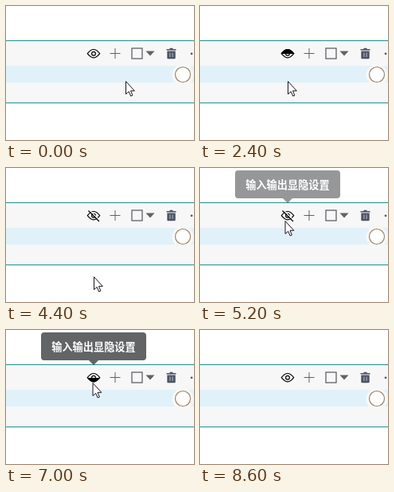
An HTML page that plays this animation: 236 px wide and 168 px high, repeating every 9.4 s.

```html
<!DOCTYPE html>
<html lang="zh-CN">
<head>
<meta charset="utf-8">
<style>
html, body { margin: 0; width: 100%; height: 100%; overflow: hidden; background: #fff; }
svg { display: block; width: 236px; height: 168px; }
text { font-family: "Noto Sans CJK SC", "Noto Sans CJK", "Noto Sans", sans-serif; }
#menu { transform-origin: 0 81px; }
#box { fill: #fff; stroke: #e4e7ed; filter: drop-shadow(0 2px 5px rgba(0,0,0,.14)); }
.item text { font-size: 15.3px; fill: #606266; }
.item path { fill: none; stroke: #606266; stroke-width: 1.2; }
.item rect { fill: none; }
.item.hover rect { fill: #e8f4f3; }
.item.hover text { fill: #48a59d; }
.item.hover path { stroke: #48a59d; }
</style>
</head>
<body>
<svg viewBox="0 0 236 168">
  <defs>
    <path id="lens" d="M102.3 59.7Q110 49.3 117.7 59.7Q110 70.1 102.3 59.7Z"/>
    <clipPath id="upper"><rect x="100" y="50" width="20" height="10"/></clipPath>
    <clipPath id="lower"><rect x="100" y="60" width="20" height="10"/></clipPath>
  </defs>

  <rect y="43" width="236" height="79" fill="#f7f7f7"/>
  <rect y="75" width="236" height="21" fill="#e1f1f9"/>
  <path d="M0 43.5H236M0 121.5H236" stroke="#1f908c" stroke-width="1.2"/>

  <!-- toolbar -->
  <g fill="none" stroke="#000" stroke-width="1.15">
    <use href="#lens"/>
    <circle cx="110" cy="59.7" r="2.4"/>
    <use id="top" href="#lens" fill="#000" clip-path="url(#upper)"/>
    <use id="bottom" href="#lens" fill="#000" clip-path="url(#lower)"/>
    <g id="slash">
      <path d="M104.6 52.6L118 66" stroke="#f7f7f7"/>
      <path d="M103.5 53.5L117 67"/>
    </g>
  </g>
  <path d="M130.5 59.5H143.5M137 53V66" stroke="#606266"/>
  <rect x="158" y="53" width="13" height="13" fill="none" stroke="#606266" stroke-width="1.3"/>
  <path d="M175.5 56.5H186.5L181 62.5Z" fill="#606266"/>
  <path d="M201.5 54H205L206 52.8H209L210 54H213.5V55.5H201.5ZM202.3 56.5H212.7V65Q212.7 66.2 211.5 66.2H203.5Q202.3 66.2 202.3 65Z" fill="#4c5364"/>
  <path d="M205.9 58.5V64M209.1 58.5V64" stroke="#c9ccd3" stroke-width=".9"/>
  <circle cx="233" cy="59.8" r="1.4" fill="#555a66"/>

  <circle cx="222" cy="86.5" r="13.5" fill="#f8f8f8"/>
  <circle cx="222" cy="86" r="9.5" fill="#fff" stroke="#a0846a" stroke-width="1.2"/>

  <g id="tip">
    <path d="M48 3H172Q176 3 176 7V34Q176 38 172 38H116L110 44L104 38H48Q44 38 44 34V7Q44 3 48 3Z" fill="#303133"/>
    <text x="110" y="25.5" text-anchor="middle" font-size="13.2" font-weight="600" fill="#fff">输入输出显隐设置</text>
  </g>

  <g id="menu">
    <g id="box">
      <rect id="panel" y="81.5" height="81" rx="4"/>
      <path id="arrow" d="M-6 82L0 75.5L6 82" stroke="none"/>
    </g>
    <g class="item"><rect y="88" height="34"/><path d="M21 104.5L25 108.5L33 100"/><text y="109.7">分享时隐藏输入</text></g>
    <g class="item"><rect y="122" height="34"/><path d="M21 139.5L25 143.5L33 135"/><text y="145.3">分享时隐藏输出</text></g>
  </g>

  <path id="cursor" d="M.5 .5V16.5L4.2 13.3L6.7 19L8.9 18L6.5 12.3H11.3Z" fill="#fff" stroke="#15151f"/>
</svg>
<script>
const STEP = 200, LOOP = 9400;
const $ = id => document.getElementById(id);
const items = [...document.querySelectorAll('.item')];

// Each round: point at the eye, wait for the menu, click one item. Times are in steps.
const rounds = [
  { hover: 2, click: 9, item: 0, eye: [112, 61] },
  { hover: 15, click: 20, item: 1, eye: [110, 61] },
  { hover: 25, click: 31, item: 0, eye: [106.5, 66] },
  { hover: 33.5, click: 40, item: 1, eye: [108.5, 66] }
];

const ramp = (s, a, b) => Math.min(1, Math.max(0, (s - a) / (b - a)));
const mix = (p, q, k) => p.map((v, i) => v + (q[i] - v) * k);
const show = (el, on) => el.setAttribute('visibility', on ? 'visible' : 'hidden');

function draw(s) {
  let pos = [150, 94], tip = 0, open = 0;
  const checked = [false, false];
  for (const { hover, click, item, eye } of rounds) {
    pos = mix(pos, eye, ramp(s, hover - 2, hover + 1));
    pos = mix(pos, [110, 94 + 42 * item], ramp(s, click - 3, click));
    tip += ramp(s, hover, hover + 2) - ramp(s, click - 2, click);
    open += ramp(s, hover + 2, hover + 3) - ramp(s, click, click + 2);
    if (s >= click) checked[item] = !checked[item];
  }
  const [x, y] = mix(pos, [120, 190], ramp(s, 41, 43));
  const both = checked[0] && checked[1];
  const width = checked[0] || checked[1] ? 165 : 144;
  const left = s < rounds[1].hover ? 37.5 : 27; // centred again once it has widened

  $('cursor').setAttribute('transform', `translate(${x} ${y})`);
  $('tip').style.opacity = tip;
  $('menu').style.opacity = open;
  $('menu').style.transform = `translateX(${left}px) scaleY(${open})`;
  $('panel').setAttribute('width', width);
  $('arrow').setAttribute('transform', `translate(${110 - left})`);
  show($('top'), checked[0] && !both);
  show($('bottom'), checked[1] && !both);
  show($('slash'), both);

  items.forEach((item, i) => {
    const [row, tick, label] = item.children;
    const edge = 88 + 34 * i;
    row.setAttribute('width', width);
    label.setAttribute('x', checked[i] ? 39.5 : 18.5);
    show(tick, checked[i]);
    item.classList.toggle('hover', open === 1 && y >= edge && y < edge + 34);
  });
}

const start = performance.now();
function tick() {
  draw(Math.floor((performance.now() - start) % LOOP / STEP));
  requestAnimationFrame(tick);
}
tick();
</script>
</body>
</html>
```
